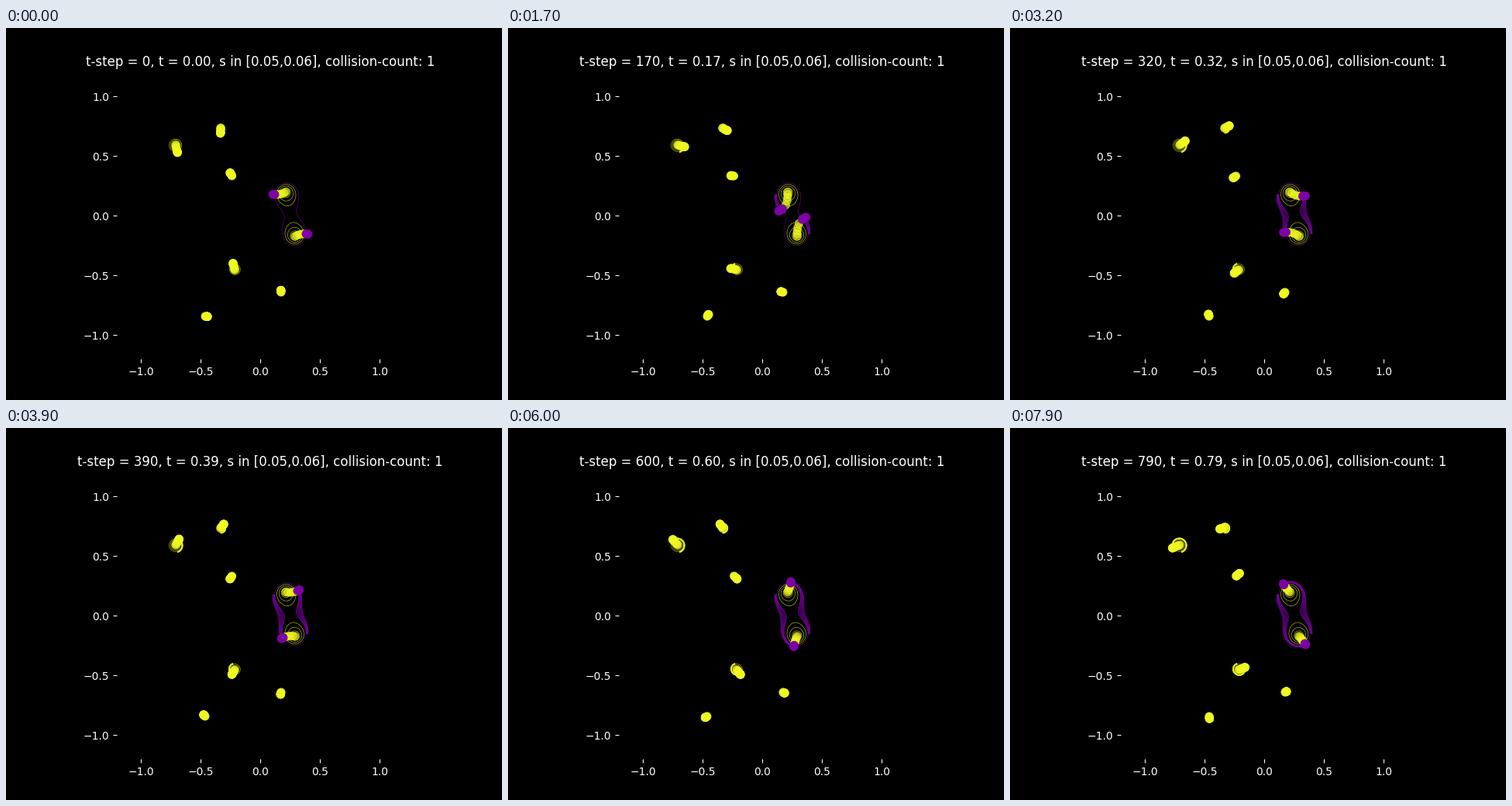
These frames come from a looping animation (640x480 px, 8000 ms). A matplotlib script:

```python
import numpy as np
import matplotlib.pyplot as plt
from matplotlib.animation import FuncAnimation
from matplotlib.collections import LineCollection

FRAMES, INTERVAL = 80, 100
YELLOW, PURPLE = "#f0f921", "#7e03a8"
S_MAX = 0.06
OLD = np.arange(6) * 0.01
BAND = np.linspace(0.05, S_MAX, 10)

# Isolated roots: base position, first and second order response at S_MAX
ROOTS = [
    (-0.708 + 0.594j, 0.0110 - 0.0620j, 0.0042 - 0.0025j),
    (-0.331 + 0.736j, -0.0010 - 0.0430j, -0.0013 - 0.0016j),
    (-0.237 + 0.334j, -0.0097 + 0.0305j, -0.0060 - 0.0036j),
    (-0.214 - 0.452j, -0.0090 + 0.0523j, -0.0053 + 0.0037j),
    (0.175 - 0.640j, -0.0049 + 0.0156j, 0.0032 + 0.0013j),
    (-0.461 - 0.842j, 0.0194 - 0.0020j, 0),
]
# Colliding pair: centre, half distance, response of the squared offset
MID, HALF = 0.253 + 0.014j, -0.039 + 0.185j
PULL = 0.0441 * np.exp(-1j * np.radians(49))


def simple_paths(s, t):
    w = s / S_MAX * np.exp(2j * np.pi * t)
    return [z + d * w + e * w**2 for z, d, e in ROOTS]


def pair_paths(s, t):
    w = s / S_MAX * np.exp(2j * np.pi * t)
    v = HALF**2 + PULL * w * (1 - 0.06j * w)
    u = np.sqrt(np.abs(v)) * np.exp(0.5j * np.unwrap(np.angle(v)))
    return [MID + u, MID - u]


def xy(z):
    z = np.asarray(z)
    return np.column_stack([z.real, z.imag])


def pair_color(s):
    return PURPLE if s > 0.0499 else YELLOW


def all_paths(s, t):
    return simple_paths(s, t) + pair_paths(s, t)


def colors(s):
    return [YELLOW] * len(ROOTS) + [pair_color(s)] * 2


plt.style.use("dark_background")
plt.rcParams["font.family"] = "DejaVu Sans"
fig, ax = plt.subplots(figsize=(6.4, 4.8), dpi=100)
fig.set_facecolor("black")
ax.set_facecolor("black")
ax.set_aspect("equal")
ax.set(xlim=(-1.2, 1.2), ylim=(-1.2, 1.2))
ax.set_xticks(np.arange(-1, 1.1, 0.5))
ax.set_yticks(np.arange(-1, 1.1, 0.5))
for spine in ax.spines.values():
    spine.set_visible(False)
title = ax.set_title("", fontsize=12)

steps = np.linspace(0, 1, 1001)
line_style = dict(linewidths=0.5, alpha=0.7)
rings = [xy(z) for s in OLD[1:] for z in all_paths(s, steps)]
ring_colors = [c for s in OLD[1:] for c in colors(s)]
ax.add_collection(LineCollection(rings, colors=ring_colors, zorder=1, **line_style),
                  autolim=False)

band = [xy(z) for s in BAND for z in all_paths(s, steps)]
trails = LineCollection([], colors=[c for s in BAND for c in colors(s)],
                        zorder=2, **line_style)
ax.add_collection(trails, autolim=False)

levels = np.concatenate([OLD, BAND])
dot_paths = np.array([all_paths(s, steps) for s in levels])
dots = ax.scatter(np.zeros(dot_paths[..., 0].size), np.zeros(dot_paths[..., 0].size),
                  s=50, c=[c for s in levels for c in colors(s)],
                  alpha=0.6, zorder=3)


def update(i):
    k = 10 * i
    title.set_text(f"t-step = {k}, t = {k / 1000:.2f}, "
                   "s in [0.05,0.06], collision-count: 1")
    trails.set_segments([p[:k + 1] for p in band])
    dots.set_offsets(xy(dot_paths[..., k].ravel()))
    return title, trails, dots


anim = FuncAnimation(fig, update, frames=FRAMES, interval=INTERVAL,
                     repeat=True, repeat_delay=0, blit=False)
plt.show()
```
